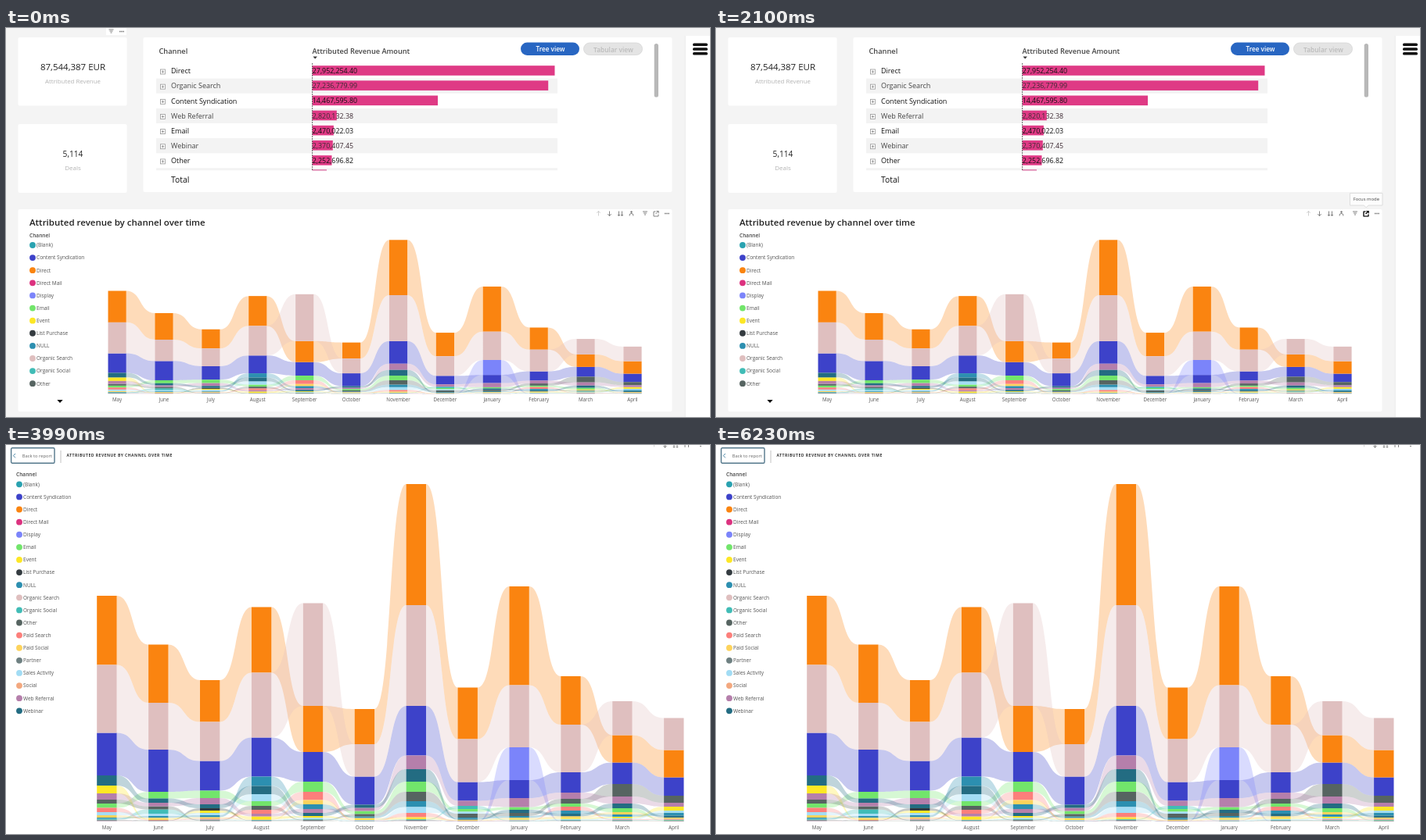
Animation of 900x498 px, one loop 6.37 s. Source, as an HTML page:

```html
<!DOCTYPE html>
<html lang="en">
<head>
<meta charset="utf-8">
<title>Attributed revenue dashboard</title>
<style>
  html, body { margin: 0; width: 100%; height: 100%; overflow: hidden; background: #fff; }
  svg { display: block; width: 900px; height: 498px; font-family: "Open Sans", "Noto Sans", sans-serif; }
  #focus, #hover, #tip, #cardTools { animation: 6370ms step-end infinite; }
  #focus { animation-name: focus; }
  #hover { animation-name: hover; }
  #tip { animation-name: tip; }
  #cardTools { animation-name: cardTools; }
  @keyframes focus { 0% { visibility: hidden } 49.451%, 100% { visibility: visible } }
  @keyframes hover { 0% { opacity: 0 } 25.275% { opacity: .5 } 26.374%, 100% { opacity: 1 } }
  @keyframes cardTools { 0% { opacity: 1 } 4.396% { opacity: .4 } 5.495%, 100% { opacity: 0 } }
  @keyframes tip {
    0% { opacity: 0 }
    28.571% { opacity: 0; animation-timing-function: steps(6, jump-start) }
    35.165%, 100% { opacity: 1 }
  }
</style>
</head>
<body>
<svg id="stage" viewBox="0 0 900 498" xmlns="http://www.w3.org/2000/svg">
  <g id="report"></g>
  <g id="focus"></g>
</svg>
<script>
const channels = {
  B: ['(Blank)', '#2aa2b0'], C: ['Content Syndication', '#3d42c9'], D: ['Direct', '#fa8410'],
  M: ['Direct Mail', '#dc327f'], Y: ['Display', '#7b84fa'], E: ['Email', '#72e56b'],
  V: ['Event', '#fde725'], L: ['List Purchase', '#343b40'], N: ['NULL', '#2c8fb0'],
  O: ['Organic Search', '#dfbfbf'], G: ['Organic Social', '#41bcb6'], H: ['Other', '#566461'],
  P: ['Paid Search', '#fc7f7b'], S: ['Paid Social', '#fdd35c'], R: ['Partner', '#6e8081'],
  A: ['Sales Activity', '#a2dcf4'], I: ['Social', '#f3a87f'], W: ['Web Referral', '#b57fab'],
  Z: ['Webinar', '#236c82']
};
const keys = Object.keys(channels);

// Month, total height, then the ranked segments; what is left goes to the minor channels.
const months = [
  'May 289 D88.5 O87 C54.5 Z13 V10 W8 H5 E5.5 P5.5 A4 S3',
  'June 226.5 D74.5 O60 C54 E8.5 Z5.5 W4.5 H4 G5.5 A3',
  'July 181 D53.5 O50 C38 E9.5 W8 Z5 L3 V3 A3',
  'August 274.5 D84 O83 C50 N12 Z10.5 A9 E6 H5 P5 W3.5 V3.5',
  'September 279.5 O131.5 D59 C38 E13 P10.5 S5.5 N6 W5 Z4',
  'October 144 D45 O41.5 C36 Z4 W4 E4 H3',
  'November 432 D155 O129 C63.5 W17.5 Z16 E13 H12 N7.5 A7.5 P5',
  'December 171.5 D66 O55 C24 W6.5 G4 E3.5 A2.5 H5',
  'January 301 D126.5 O79.5 Y42 C23 W11.5 E3.5 Z4 H4',
  'February 186 D62 O61 C26 W8 H6 E4 P5 N4',
  'March 154 O43.5 D35 C27.5 H16 W9 Z6 E5 S3',
  'April 132.5 O41 D35 C23.5 H9 W5 V5 A3'
].map(line => {
  const [name, total, ...parts] = line.split(' ');
  const segs = {};
  let y = +total;
  const add = (key, h) => { segs[key] = [y, y - h]; y -= h; };
  parts.forEach(p => add(p[0], +p.slice(1)));
  const minor = [...'NZSVAPGEHWLRBIMYCDO'].filter(k => !segs[k]);
  const rest = y;
  minor.forEach((k, i) => add(k, rest * .32 * .68 ** i));
  return { name, segs };
});

const rect = (x, y, w, h, fill, more = '') =>
  `<rect x="${x}" y="${y}" width="${w}" height="${h}" fill="${fill}" ${more}/>`;
const path = (d, stroke, width = 1, fill = 'none') =>
  `<path d="${d}" stroke="${stroke}" stroke-width="${width}" fill="${fill}"/>`;
// y is the middle of the line of text
const text = (str, x, y, size, fill, more = '') =>
  `<text x="${x}" y="${y + size * .36}" font-size="${size}" fill="${fill}" ${more}>${str}</text>`;
const mid = 'text-anchor="middle"', semi = 'font-weight="600"';

function chart(x0, step, barW, base, scale, labelY) {
  const ys = v => base - v * scale;
  let ribbons = '', bars = '';
  months.forEach((m, i) => {
    const x = x0 + i * step, next = months[i + 1];
    for (const k of keys) {
      const [top, low] = m.segs[k].map(ys), color = channels[k][1];
      bars += rect(x, top, barW, low - top, color);
      if (!next) continue;
      const [top2, low2] = next.segs[k].map(ys);
      const a = x + barW, b = x + step, bend = (b - a) * .55;
      ribbons += path(`M${a} ${top}C${a + bend} ${top} ${b - bend} ${top2} ${b} ${top2}` +
        `V${low2}C${b - bend} ${low2} ${a + bend} ${low} ${a} ${low}Z`, 'none', 0, color);
    }
    bars += text(m.name, x + barW / 2, labelY, 6.2, '#555', mid);
  });
  return `<g fill-opacity=".29">${ribbons}</g>${bars}`;
}

function legend(x, y, count) {
  return text('Channel', x - 4, y - 12.7, 6.6, '#444', semi) +
    keys.slice(0, count).map((k, i) => {
      const cy = y + i * 16.11;
      return `<circle cx="${x}" cy="${cy}" r="3.9" fill="${channels[k][1]}"/>` +
        text(channels[k][0], x + 5, cy, 6.55, '#555');
    }).join('');
}

const funnel = (x, y, c) => path(`M${x - 3} ${y - 2.5}h6M${x - 2} ${y - .5}h4M${x - 1} ${y + 1.5}h2`, c, .9);
const dots = (x, y, c) => path(`M${x - 3} ${y}h6`, c, 1.3).replace('/>', ' stroke-dasharray="1.5 .7"/>');
const popOut = (x, y, c, w) =>
  path(`M${x - .5} ${y - 2.5}h-2.5v6h6v-2.5M${x + .5} ${y - 3}h2.7v2.7M${x + 3} ${y - 3}l-3.5 3.5`, c, w);

function tools() {
  const c = '#777', y = 237.5;
  const down = x => `M${x} ${y - 3}v6`;
  return path(`M757.5 ${y + 3}v-6m-2.2 2.3l2.2 -2.3l2.2 2.3`, '#c4c4c4', .8) +
    path(`${down(771.5)}m-2.2 -2.3l2.2 2.3l2.2 -2.3`, c, .9) +
    path(`${down(783.5)}m-1.5 -1.6l1.5 1.6l1.5 -1.6${down(787.5)}m-1.5 -1.6l1.5 1.6l1.5 -1.6`, c, .9) +
    path(`M799.5 ${y - 3}v3m-2.3 3v-1.5q0 -1.5 2.3 -1.5t2.3 1.5v1.5m-3.8 -4.5l1.5 -1.5l1.5 1.5`, c, .9) +
    funnel(817, y, c) + popOut(831, y, c, .9) + dots(845, y, c) +
    `<g id="hover">${popOut(831, y, '#111', 1.2)}</g>`;
}

function table() {
  const rows = [
    ['Direct', '27,952,254.40', 310], ['Organic Search', '27,236,779.99', 301.7],
    ['Content Syndication', '14,467,595.80', 160.5], ['Web Referral', '2,820,132.38', 31.3],
    ['Email', '2,470,022.03', 27.4], ['Webinar', '2,370,407.45', 26.3], ['Other', '2,252,696.82', 25]
  ];
  let out = text('Channel', 195.5, 30, 9.25, '#444', semi) +
    text('Attributed Revenue Amount', 391.5, 30, 9.2, '#444', semi) +
    path('M392.5 36.5h5.4l-2.7 3z', 'none', 0, '#333');
  rows.forEach(([name, value, w], i) => {
    const y = 55 + i * 19.15, odd = i % 2, ink = odd ? '#444' : '#111';
    if (odd) out += rect(192, y - 9.6, 513, 19.2, '#f3f3f3');
    out += rect(391.5, y - 6.8, w, 12.6, '#df3a85') +
      rect(197.5, y - 2, 6, 6, '#fff', 'stroke="#999" stroke-width=".8"') +
      path(`M198.8 ${y + 1}h3.4m-1.7 -1.7v3.4`, '#777', .7) +
      text(name, 211, y, 9, ink) + text(value, 391.8, y, 8.85, odd ? '#3d2a33' : '#111');
  });
  return out + rect(192, 179.3, 513, 3, '#f3f3f3') + rect(391.5, 181.2, 18.5, 1.3, '#d9699f') +
    path('M391.6 45V182.5', '#444', .8).replace('/>', ' stroke-dasharray="2 1"/>') +
    text('Total', 211, 194, 10.4, '#111');
}

const card = (x, y, w, h) => rect(x, y, w, h, '#fff', 'rx="2"');

document.getElementById('report').innerHTML =
  rect(0, 0, 900, 498, '#f4f4f4') +
  rect(868, 10, 32, 488, '#fff') + path('M868.3 10V498', '#e6e6e6', .8) +
  card(15.5, 12, 139, 87.5) + card(15.5, 123, 139, 88) + card(175.5, 12, 676, 198) + card(15.5, 232, 836, 259) +
  `<g id="cardTools">${rect(128, 0, 26, 9, '#fff')}${funnel(134.5, 4.5, '#777')}${dots(148, 4.5, '#777')}</g>` +
  text('87,544,387 EUR', 85.5, 50, 11.5, '#222', mid) +
  text('Attributed Revenue', 85.5, 68, 7.85, '#b3b3b3', mid) +
  text('5,114', 85.5, 161, 10.2, '#222', mid) +
  text('Deals', 85.5, 179.5, 8, '#b3b3b3', mid) +
  table() +
  rect(658, 18.5, 75, 16.5, '#2866c2', 'rx="8.2"') +
  text('Tree view', 696, 27.5, 8.2, '#fff', mid + semi) +
  rect(738.5, 19, 75, 15.5, '#e4e4e4', 'rx="7.7" stroke="#d6d6d6" stroke-width=".8"') +
  text('Tabular view', 776.5, 27.5, 8.4, '#bcbcbc', mid + semi) +
  rect(828.7, 20, 5.3, 68.5, '#b8b8b8', 'rx="2.6"') +
  [21.3, 27, 32.7].map(y => rect(878, y - 1.7, 19, 3.5, '#111', 'rx="1.6"')).join('') +
  text('Attributed revenue by channel over time', 30, 248.5, 11.5, '#222', semi) +
  legend(34, 278, 12) + path('M65.3 476h7.4l-3.7 4z', 'none', 0, '#111') +
  chart(130.5, 59.9, 23.2, 468.3, .456, 476) +
  tools() +
  `<g id="tip">${path('M810.5 211.5h41.5v15.5h-18l-2.8 3l-2.8 -3h-17.9z', '#d2d2d2', .8, '#fff')}` +
  text('Focus mode', 831.3, 219, 5.9, '#222', mid) + '</g>';

document.getElementById('focus').innerHTML =
  rect(0, 0, 900, 498, '#fff') +
  rect(6.6, 3.8, 55.4, 19.4, '#fff', 'rx="1.5" stroke="#54788c" stroke-width="1.4"') +
  path('M12 11l-2.6 2.7l2.6 2.7', '#3c7ea0', .9) +
  text('Back to report', 20.8, 14, 5.75, '#666') +
  path('M70 7V23', '#bbb', .9) +
  text('ATTRIBUTED REVENUE BY CHANNEL OVER TIME', 77.5, 13.2, 5, '#333', 'font-weight="700" letter-spacing=".5"') +
  path('M828.5 0v2.5', '#ccc', .8) +
  path('M842.5 0v3.3m-2.2 -2.2l2.2 2.2l2.2 -2.2M854 0v3.3m-1.2 -1.2l1.2 1.2l1.2 -1.2M858 0v3.3m-1.2 -1.2l1.2 1.2l1.2 -1.2M868 0v3M872.5 0v3M887 1.5h2', '#777', .9) +
  legend(17, 50.3, 19) +
  chart(116.2, 65.9, 25.4, 482, 1, 489.5);
</script>
</body>
</html>
```
